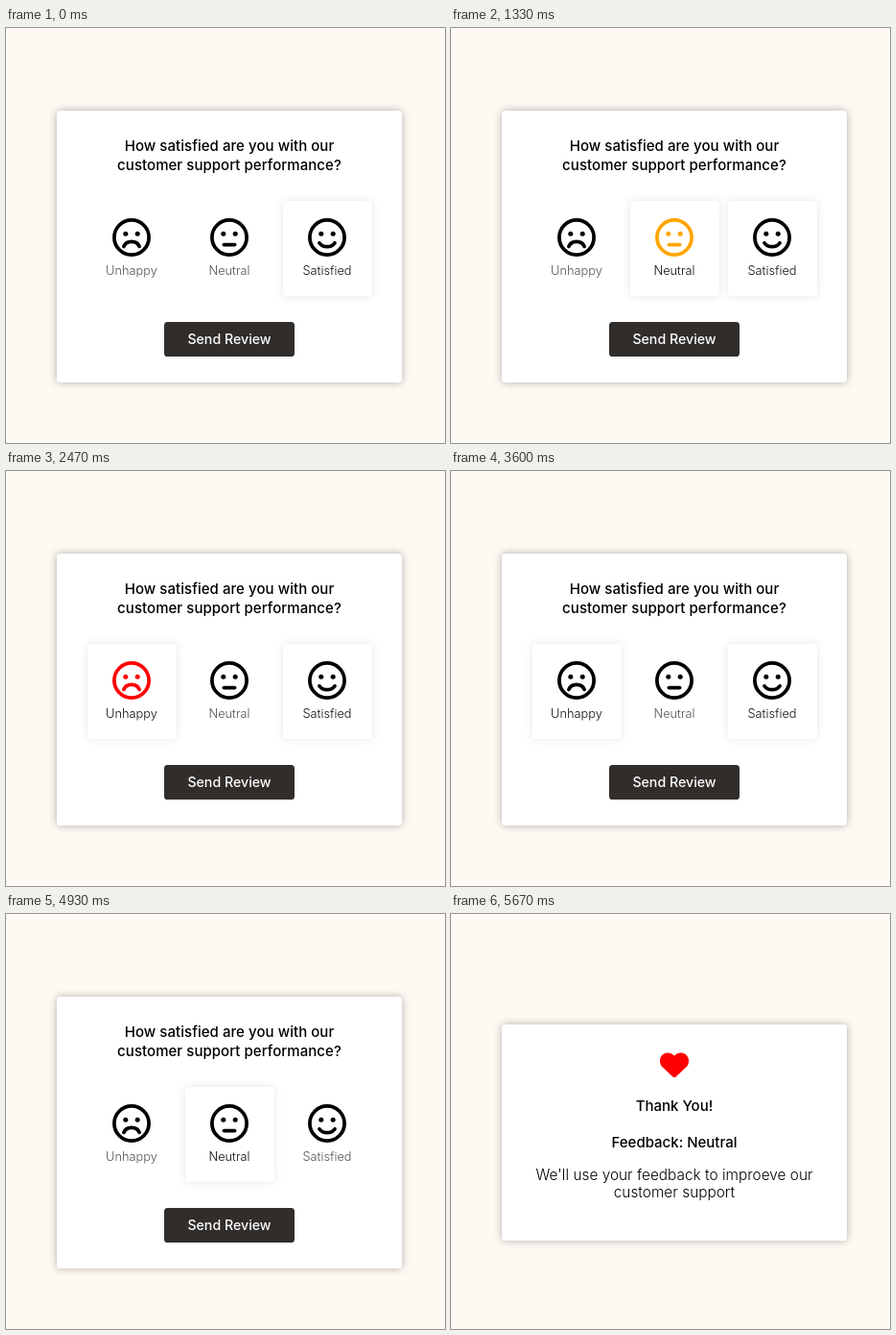
These frames come from a looping animation (458x432 px, 7470 ms). An HTML page:

```html
<!DOCTYPE html>
<html lang="en">
<head>
<meta charset="utf-8">
<title>Feedback</title>
<style>
  html, body { margin: 0; width: 100%; height: 100%; overflow: hidden; background: #fef9f2; }
  svg { display: block; width: 100%; height: 100%; }
  text { font-family: Inter, "Open Sans", sans-serif; text-anchor: middle; }
  .panel { fill: #fff; }
  .light { font-weight: 300; }
  .medium { font-weight: 500; }
  .face { fill: none; stroke-width: 3.75; stroke-linecap: round; }
</style>
</head>
<body>
<svg viewBox="0 0 458 432">
  <defs>
    <filter id="deep" x="-10%" y="-10%" width="120%" height="120%" color-interpolation-filters="sRGB">
      <feDropShadow dx="0" dy="0" stdDeviation="4.5" flood-opacity=".3"/>
    </filter>
    <filter id="soft" x="-20%" y="-20%" width="140%" height="140%" color-interpolation-filters="sRGB">
      <feDropShadow dx="0" dy="0" stdDeviation="4.5" flood-opacity=".1"/>
    </filter>
  </defs>
  <rect width="458" height="432" fill="#fef9f2"/>

  <g id="form">
    <rect class="panel" x="53" y="86" width="360" height="283" rx="3.6" filter="url(#deep)"/>
    <g class="medium" font-size="15" letter-spacing=".05">
      <text x="233" y="128">How satisfied are you with our</text>
      <text x="233" y="148">customer support performance?</text>
    </g>
    <g id="ratings"></g>
    <g id="button">
      <rect x="-68" y="-18" width="136" height="36" rx="3.6" fill="#302d2b"/>
      <text class="medium" y="5" font-size="14.2" fill="#fff">Send Review</text>
    </g>
  </g>

  <g id="thanks">
    <rect class="panel" x="53" y="115" width="360" height="225" rx="3.6" filter="url(#deep)"/>
    <path transform="translate(233 157)" fill="#f00"
      d="M0-9.4L.7-10.1C2.6-12 5.3-12.9 8-12.4C12-11.7 15-8.2 15-4.1V-3.8C15-1.4 14 .9 12.2 2.6
         L1.6 12.5C.7 13.3-.7 13.3-1.6 12.5L-12.2 2.6C-14 .9-15-1.4-15-3.8V-4.1
         C-15-8.2-12-11.7-8-12.4C-5.3-12.9-2.6-12-.7-10.1Z"/>
    <g class="medium" font-size="15">
      <text x="233" y="205">Thank You!</text>
      <text x="233" y="243">Feedback: Neutral</text>
    </g>
    <g class="light" font-size="15.3" letter-spacing=".05">
      <text x="233" y="277">We'll use your feedback to improeve our</text>
      <text x="233" y="295">customer support</text>
    </g>
  </g>
</svg>

<script>
const LOOP = 7470;
const UNHAPPY = 0, NEUTRAL = 1, SATISFIED = 2, NONE = -1;
const $ = id => document.getElementById(id);

const ratings = [
  { label: 'Unhappy', color: '#f00', mouth: 'M-8.1 9.4C-6.9 6.3-3.8 4.4 0 4.4S6.9 6.3 8.1 9.4' },
  { label: 'Neutral', color: '#ffa500', mouth: 'M-5.6 7.5H5.6' },
  { label: 'Satisfied', color: '#008000', mouth: 'M-8 5.8C-6 8.3-3.2 9.7 0 9.7S6 8.3 8 5.8' }
];

$('ratings').innerHTML = ratings.map((r, i) => `
  <g transform="translate(${131 + 102 * i} 218)">
    <rect class="panel" x="-46" y="-38" width="93" height="99" rx="3.6" filter="url(#soft)"/>
    <g class="icon">
      <circle class="face" r="18.1" stroke="currentColor"/>
      <circle cx="-6.2" cy="-3.75" r="2.5" fill="currentColor"/>
      <circle cx="6.2" cy="-3.75" r="2.5" fill="currentColor"/>
      <path class="face" d="${r.mouth}" stroke="currentColor"/>
    </g>
    <text class="light" y="39" font-size="12.8">${r.label}</text>
  </g>`).join('');

const parts = [...$('ratings').children].map(g => ({
  box: g.querySelector('rect'),
  icon: g.querySelector('.icon'),
  label: g.querySelector('text')
}));

// Each track is a list of [start time, value].
const hoveredBox = [[0, NONE], [400, SATISFIED], [1260, NEUTRAL], [2400, UNHAPPY], [3670, NEUTRAL], [4930, NONE]];
const hoveredIcon = [[0, NONE], [400, SATISFIED], [1260, NONE], [1330, NEUTRAL], [2340, NONE],
  [2470, UNHAPPY], [3600, NONE], [3800, NEUTRAL], [4930, NONE]];
const selected = [[0, SATISFIED], [4200, NEUTRAL]];
const HOVER = 5130, PRESS = 5530, DONE = 5670;

const at = (track, t) => track.filter(([start]) => start <= t).pop()[1];
const show = (el, on) => el.setAttribute('visibility', on ? 'inherit' : 'hidden');

function draw(t) {
  const box = at(hoveredBox, t), icon = at(hoveredIcon, t), active = at(selected, t);
  show($('form'), t < DONE);
  show($('thanks'), t >= DONE);

  parts.forEach((part, i) => {
    const raised = i === box || i === active;
    show(part.box, raised);
    part.label.setAttribute('fill', raised ? '#111' : '#555');
    part.icon.setAttribute('color', i === icon ? ratings[i].color : '#000');
  });

  const scale = t >= PRESS ? 0.98 : 1;
  $('button').setAttribute('transform', `translate(233 324) scale(${scale})`);
  $('button').setAttribute('opacity', t >= HOVER ? 0.8 : 1);
}

const begin = performance.now();
function tick() {
  draw((performance.now() - begin) % LOOP);
  requestAnimationFrame(tick);
}
tick();
</script>
</body>
</html>
```
